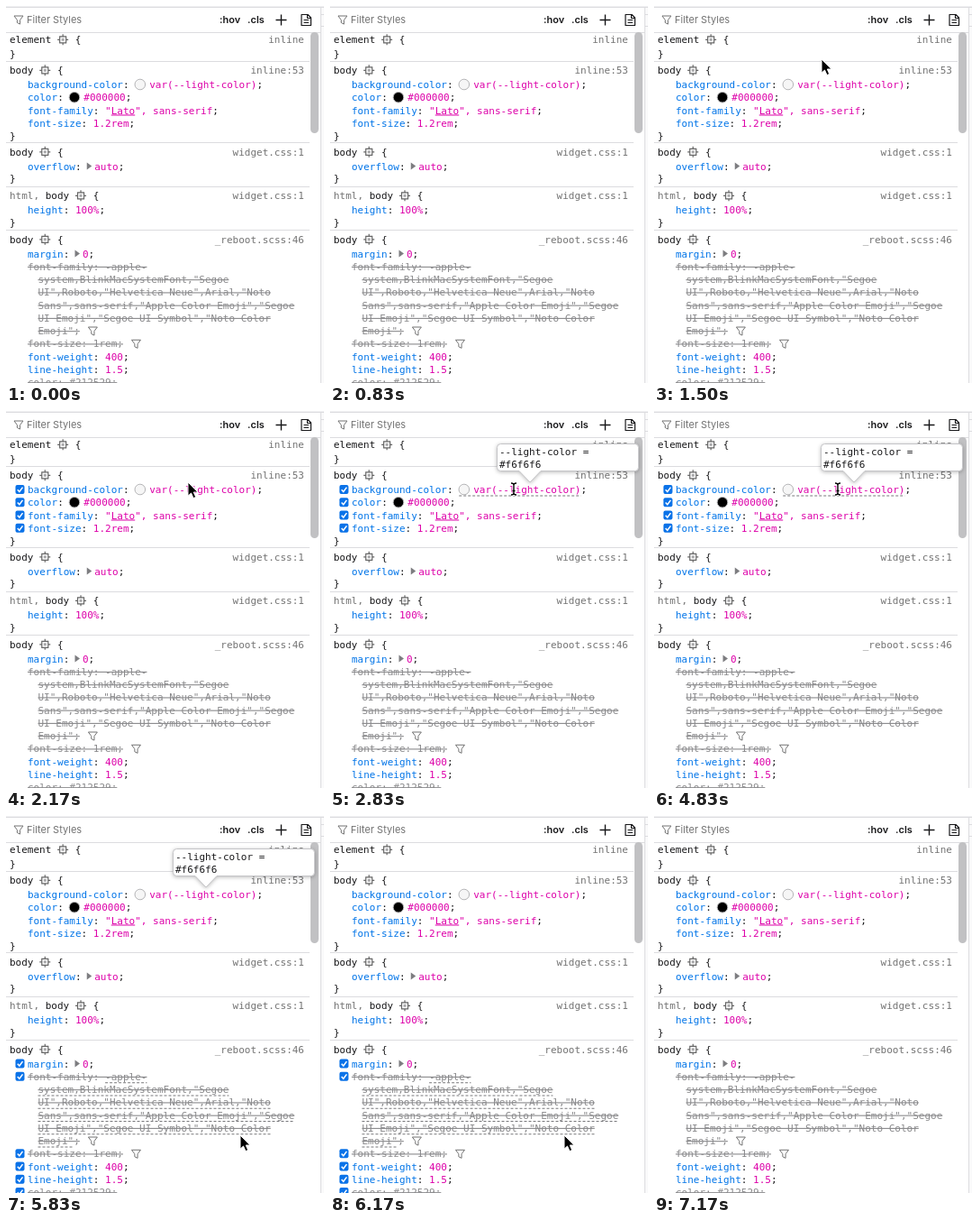
Recreate the animation shown at these times as an HTML page. Size 353 px wide and 418 px high, loop 7.34 s.

```html
<!DOCTYPE html>
<html lang="en">
<head>
<meta charset="utf-8">
<title>Style rules</title>
<style>
html, body { margin: 0; width: 100%; height: 100%; overflow: hidden; background: #fff; }
svg { display: block; }
text { font: 11px "DejaVu Sans Mono", monospace; white-space: pre; fill: #18181a; }
text.ui { font-family: Inter, "Liberation Sans", sans-serif; }
.muted { fill: #737373; }
.prop { fill: #0074e8; }
.value { fill: #dd00a9; }
.struck, .struck tspan { fill: #8a8a8c; text-decoration: line-through; }
.hidden { display: none; }
</style>
</head>
<body>
<svg id="stage" width="353" height="418" viewBox="0 0 353 418"></svg>
<script>
const LOOP = 7340, CHAR = 6.623, LINE = 14.25;
const stage = document.getElementById('stage');

function add(parent, tag, attrs = {}, content = '') {
  const el = document.createElementNS('http://www.w3.org/2000/svg', tag);
  for (const key in attrs) el.setAttribute(key, attrs[key]);
  el.textContent = content;
  parent.append(el);
  return el;
}
const group = (parent, attrs) => add(parent, 'g', attrs);
const path = (parent, d, attrs) => add(parent, 'path', { d, fill: 'none', ...attrs });
const rect = (parent, x, y, width, height, attrs) => add(parent, 'rect', { x, y, width, height, ...attrs });
const label = (parent, x, y, str, cls = '', attrs = {}) =>
  add(parent, 'text', { x, y: y + 4, class: cls, ...attrs }, str);

// Text made of [string, class] runs
function runs(parent, x, y, parts, cls = '') {
  const text = label(parent, x, y, '', cls);
  for (const [str, runClass] of parts) add(text, 'tspan', { class: runClass }, str);
}

function funnel(parent, x, y) {
  path(parent, 'M-5-4.5H5L1.6 0V4.6L-1.6 3V0Z',
    { transform: `translate(${x} ${y})`, stroke: '#737373', 'stroke-linejoin': 'round' });
}

function target(parent, x, y) {
  const g = group(parent, { transform: `translate(${x} ${y})` });
  path(g, 'M-3.5-3.5H3.5V3.5H-3.5ZM0-6V-3.5M0 3.5V6M-6 0H-3.5M3.5 0H6', { stroke: '#666', 'stroke-width': 1.2 });
  rect(g, -1.5, -1.5, 3, 3, { fill: '#a8a8aa' });
}

function checkbox(parent, y) {
  rect(parent, 10.5, y - 5, 10, 10, { rx: 2, fill: '#0a72e8' });
  path(parent, `M12.8 ${y + .2}l2.1 2.3 3.6-4.9`, { stroke: '#fff', 'stroke-width': 1.5 });
}

function dashes(parent, x1, x2, y) {
  path(parent, `M${x1} ${y + 7}H${x2}`, { stroke: '#77777a', 'stroke-dasharray': '3 2' });
}

const rules = [
  { top: 27, selector: 'element', link: 'inline', decls: [] },
  { top: 61, selector: 'body', link: 'inline:53', decls: [
    { prop: 'background-color', value: 'var(--light-color)', swatch: '#f6f6f6' },
    { prop: 'color', value: '#000000', swatch: '#000' },
    { prop: 'font-family', value: '"Lato", sans-serif', underline: [1, 5] },
    { prop: 'font-size', value: '1.2rem' }] },
  { top: 151.5, selector: 'body', link: 'widget.css:1', decls: [
    { prop: 'overflow', value: 'auto', arrow: true }] },
  { top: 200, selector: 'body', prefix: 'html, ', link: 'widget.css:1', decls: [
    { prop: 'height', value: '100%' }] },
  { top: 248.5, selector: 'body', link: '_reboot.scss:46', decls: [
    { prop: 'margin', value: '0', arrow: true },
    { prop: 'font-family', value: '-apple-', struck: true, filter: true, more: [
      'system,BlinkMacSystemFont,"Segoe',
      'UI",Roboto,"Helvetica Neue",Arial,"Noto',
      'Sans",sans-serif,"Apple Color Emoji","Segoe',
      'UI Emoji","Segoe UI Symbol","Noto Color',
      'Emoji"'] },
    { prop: 'font-size', value: '1rem', struck: true, filter: true },
    { prop: 'font-weight', value: '400' },
    { prop: 'line-height', value: '1.5' },
    { prop: 'color', value: '#212529', struck: true }] }
];

function drawDecl(rule, decl, y) {
  const { prop, value, struck, more = [] } = decl;
  const valueStart = 24 + (prop.length + 2) * CHAR;
  const x = valueStart + (decl.swatch ? 16 : decl.arrow ? 8 : 0);
  const end = x + value.length * CHAR;
  checkbox(rule.checks, y);
  decl.hover = group(stage, { class: 'hidden' });
  dashes(decl.hover, valueStart, end, y);

  if (struck) {
    label(stage, 24, y, `${prop}: ${value}${more.length ? '' : ';'}`, 'struck');
  } else {
    runs(stage, 24, y, [[prop, 'prop'], [':', '']]);
    runs(stage, x, y, [[value, 'value'], [';', '']]);
  }
  if (decl.swatch)
    add(stage, 'circle', { cx: valueStart + 5.6, cy: y, r: 5.8, fill: decl.swatch, stroke: '#b5b5b7' });
  if (decl.arrow) path(stage, `M${valueStart - .5} ${y - 4}l5.5 4-5.5 4Z`, { fill: '#7d7d80' });
  if (decl.underline) {
    const [from, to] = decl.underline;
    path(stage, `M${x + from * CHAR} ${y + 5.5}H${x + to * CHAR}`, { stroke: '#dd00a9' });
  }

  let lastX = end;
  more.forEach((str, i) => {
    const last = i === more.length - 1;
    y += LINE;
    lastX = 35.5 + str.length * CHAR;
    label(stage, 35.5, y, str + (last ? ';' : ''), 'struck');
    dashes(decl.hover, 35.5, lastX, y);
  });
  if (decl.filter) funnel(stage, lastX + CHAR + 14.5, y + .5);
  return y + LINE;
}

function drawRule(rule) {
  const { top, selector, prefix = '', link, decls } = rule;
  const head = top + 10.3;
  const iconX = 4 + (prefix + selector).length * CHAR + 12.8;
  rule.checks = group(stage, { class: 'hidden' });
  if (top > 30) path(stage, `M0 ${Math.floor(top) + .5}H337`, { stroke: '#dcdcdf' });
  runs(stage, 4, head, [[prefix, 'muted'], [selector, '']]);
  target(stage, iconX, head);
  label(stage, iconX + 13.6, head, '{');
  label(stage, 331, head, link, 'muted', { 'text-anchor': 'end' });
  const y = decls.reduce((rowY, decl) => drawDecl(rule, decl, rowY), top + 26);
  label(stage, 4, y - .5, '}');
}

function drawFrame() {
  rect(stage, 0, 0, 353, 418, { fill: '#fff' });
  rect(stage, 0, 0, 353, 2, { fill: '#f0f0f2' });
  path(stage, 'M0 1.5H353M0 29.5H349', { stroke: '#dcdcdf' });
  funnel(stage, 14, 15.5);
  label(stage, 23, 15, 'Filter Styles', 'ui muted');
  for (const [x, str] of [[237, ':hov'], [268, '.cls']])
    label(stage, x, 15, str, 'ui', { style: 'font-weight:600' });
  path(stage, 'M299.5 15.5H311.5M305.5 9.5V21.5', { stroke: '#18181a', 'stroke-width': 1.4 });
  path(stage, 'M328 9.5H335L338.5 13V21.5H328ZM334.5 9.5V13.5H338.5M330.5 15.5H336M330.5 18.5H336',
    { stroke: '#18181a', 'stroke-width': 1.2, 'stroke-linejoin': 'round' });
  rect(stage, 338, 29, 9, 112, { rx: 4.5, fill: '#c1c1c3' });
  rect(stage, 349, 2, 4, 416, { fill: '#f9f9fa' });
  path(stage, 'M349.5 2V418M349 9.5H353M349 22.5H353', { stroke: '#dcdcdf' });
}

function drawTooltip() {
  const g = group(stage, { style: 'filter:drop-shadow(0 1px 2px #0004)' });
  path(g, 'M189.5 36.5H338.5Q342.5 36.5 342.5 40.5V62.5Q342.5 66.5 338.5 66.5H234L222 79 210 66.5H189.5Q185.5 66.5 185.5 62.5V40.5Q185.5 36.5 189.5 36.5Z',
    { fill: '#fff', stroke: '#c4c4c7' });
  label(g, 188, 45, '--light-color =');
  label(g, 188, 58.5, '#f6f6f6');
  return g;
}

drawFrame();
rules.forEach(drawRule);
const tooltip = drawTooltip();
const pointers = {
  arrow: path(stage, 'M0 0V15.2L3.5 12 6 17.6 8.7 16.4 6.3 11H11Z', { fill: '#000', stroke: '#fff' }),
  beam: group(stage)
};
for (const [stroke, width] of [['#fff', 3], ['#000', 1.4]])
  path(pointers.beam, 'M-3-6.5Q0-6.5 0-4.5 0-6.5 3-6.5M0-5V5M-3 6.5Q0 6.5 0 4.5 0 6.5 3 6.5M-1.5 2H1.5',
    { stroke, 'stroke-width': width });

// Pointer steps: start ms, x, y, shape, hovered declaration
const variable = rules[1].decls[0], fontStack = rules[4].decls[1];
const steps = [
  { at: 0 },
  { at: 1330, x: 185, y: 17, shape: 'arrow' },
  { at: 1500, x: 186, y: 59, shape: 'arrow' },
  { at: 1670, x: 202, y: 79, shape: 'arrow' },
  { at: 2330, x: 204, y: 86.5, shape: 'beam', over: variable },
  { at: 5670, x: 234, y: 230, shape: 'arrow' },
  { at: 5830, x: 260, y: 354, shape: 'arrow', over: fontStack },
  { at: 6500, x: 262, y: 220, shape: 'arrow' },
  { at: 6670, x: 268, y: 100, shape: 'arrow' },
  { at: 6830, x: 274, y: 12, shape: 'arrow' },
  { at: 7000 }
];
const show = (el, on) => el.classList.toggle('hidden', !on);

function render(time) {
  const step = steps.findLast(s => s.at <= time);
  for (const name in pointers) show(pointers[name], step.shape === name);
  if (step.shape) pointers[step.shape].setAttribute('transform', `translate(${step.x} ${step.y})`);
  const hovered = step.shape && rules.findLast(r => r.top <= step.y);
  for (const rule of rules) {
    show(rule.checks, rule === hovered);
    for (const decl of rule.decls) show(decl.hover, decl === step.over);
  }
  show(tooltip, time >= 2330 && time < 6000);
}

const start = performance.now();
function tick() {
  render((performance.now() - start) % LOOP);
  requestAnimationFrame(tick);
}
tick();
</script>
</body>
</html>
```
